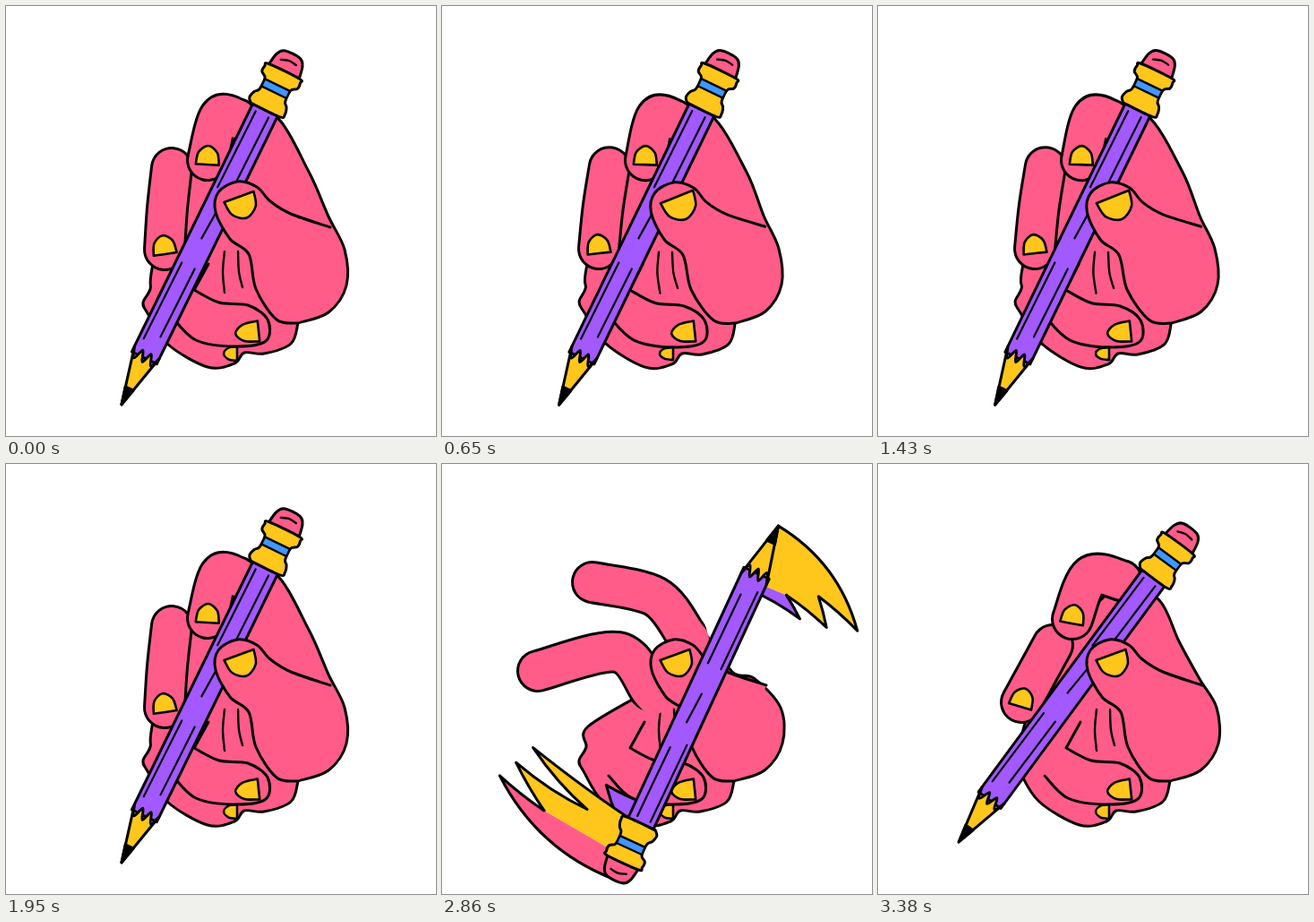
An HTML page with a canvas that plays this animation: 480 px wide and 480 px high, repeating every 3.51 s.

```html
<!DOCTYPE html>
<html lang="en">
<head>
<meta charset="utf-8">
<title>Pencil spin</title>
<style>
html, body { margin: 0; width: 100%; height: 100%; overflow: hidden; background: #fff; }
canvas { display: block; width: 100vw; height: 100vh; }
</style>
</head>
<body>
<canvas id="stage" width="480" height="480"></canvas>
<script>
const ctx = document.getElementById('stage').getContext('2d');
const PINK = '#ff5c8a', PURPLE = '#a259ff', YELLOW = '#ffc61c', BLUE = '#3f97ff', INK = '#000';
const STEP = 130, IDLE_STEPS = 18, SPIN_STEPS = 9;
const FINGER = 45, HALF = 218;

// "x y, x y": a repeated point makes a corner, all others are smooth.
const points = text => text.split(',').map(pair => pair.trim().split(' ').map(Number));
const mirrored = text => {
  const half = points(text);
  return half.concat(half.map(([x, y]) => [-x, y]).reverse());
};
const lerp = (a, b, t) => a + (b - a) * t;
const radians = deg => deg * Math.PI / 180;

// Fixed parts of the hand.
const palm = points('378 272, 380 312, 360 342, 326 354, 326 354, 318 377, 288 388, 266 387, 255 399, 225 403, 180 377, 158 343, 153 331, 161 316, 163 293');
const thumb = points('362 247, 318 232, 295 218, 280 202, 258 196, 237 208, 234 230, 250 260, 271 277, 279 316, 302 350, 326 354');
const ring = points('226 288, 210 317, 210 317, 238 331, 270 334, 292 350, 290 374, 255 380, 212 373, 186 348');

// Moving parts: edge of the back, then finger bones from knuckle to tip.
const pose = (back, index, middle) =>
  ({ back: points(back), index: points(index), middle: points(middle) });
const grip = pose('300 122, 338 185, 360 235', '258 126, 238 124, 225 172', '185 181, 180 226, 177 272');
const upright = pose('275 124, 308 166, 350 238', '262 150, 222 132, 191 124', '188 188, 192 235, 204 279');
const open = pose('292 188, 324 232, 348 239', '272 190, 238 148, 168 132', '232 252, 196 210, 107 231');
const caught = pose('314 152, 336 198, 359 240', '272 130, 237 125, 217 173', '195 202, 177 235, 160 266');

// Shape of the pencil, tip at the origin, eraser upwards.
const shaft = points('-15.5 -58, -15.5 -366, 15.5 -366, 15.5 -58');
const ferrule = mirrored('-18 -366, -22 -371, -20 -379, -16 -384, -16 -398, -22 -403, -22 -410, -19 -414');
const eraser = mirrored('-19 -412, -19 -412, -16 -428, -9 -435');
const shine = points('-9 -424, 0 -427, 9 -426');
const wave = Array.from({ length: 7 }, (_, i) => [-15.5 + i * 31 / 6, i % 2 ? -53 : -65]);

// Trails in polar form around the pencil's middle: radius, lag in degrees, bend.
const tipTrails = [
  [YELLOW, [[150, 0], [218, 0], [197, 41, 16], [181, 24], [168, 35], [157, 15]]],
  [PURPLE, [[157, 15], [149, 26], [140, 0], [150, 0]]]
];
const eraserTrails = [
  [PURPLE, [[150, 0], [155, 10], [136, 23], [125, 0]]],
  [YELLOW, [[190, 0], [150, 0], [189, 50, -14], [170, 21], [212, 47], [208, 30]]],
  [PINK, [[190, 0], [217, 0], [234, 45, 16], [208, 30]]]
];

function trace(p) {
  ctx.beginPath();
  ctx.moveTo(...p[0]);
  for (let i = 0; i < p.length - 1; i++) {
    const a = p[i - 1] || p[i], b = p[i], c = p[i + 1], d = p[i + 2] || c;
    if (b[0] === c[0] && b[1] === c[1]) continue;
    ctx.bezierCurveTo(b[0] + (c[0] - a[0]) / 6, b[1] + (c[1] - a[1]) / 6,
      c[0] - (d[0] - b[0]) / 6, c[1] - (d[1] - b[1]) / 6, c[0], c[1]);
  }
}

function paint(fill, width = 3) {
  if (fill) {
    ctx.fillStyle = fill;
    ctx.fill();
  }
  ctx.lineWidth = width;
  ctx.stroke();
}

function draw(p, fill, width) {
  trace(p);
  paint(fill, width);
}

function polygon(p, fill) {
  ctx.beginPath();
  p.forEach(q => ctx.lineTo(...q));
  ctx.closePath();
  paint(fill);
}

function at(x, y, turn, paintParts) {
  ctx.save();
  ctx.translate(x, y);
  ctx.rotate(radians(turn));
  paintParts();
  ctx.restore();
}

// Straight edge centred on (0, base), round end above it.
function nail(x, y, turn, w, h, base = 0) {
  at(x, y, turn, () => {
    const left = [-w / 2, base], right = [w / 2, base];
    draw([left, left, right, right, [w * 0.4, base - h * 0.65], [0, base - h],
      [-w * 0.4, base - h * 0.65], left, left], YELLOW, 2.6);
  });
}

function finger(bones) {
  const [knuckle, joint, tip] = bones;
  const hangs = tip[1] > knuckle[1] + 15;
  trace(bones);
  ctx.lineWidth = FINGER + 3;
  ctx.stroke();
  // A lifted finger runs into the hand without an edge.
  const gap = Math.hypot(knuckle[0] - joint[0], knuckle[1] - joint[1]);
  const inner = knuckle.map((v, i) => v + (v - joint[i]) * 8 / gap);
  trace(hangs ? bones : [inner, ...bones]);
  ctx.strokeStyle = PINK;
  ctx.lineWidth = FINGER - 3;
  ctx.stroke();
  ctx.strokeStyle = INK;
  if (hangs) {
    const lean = Math.atan2(joint[0] - tip[0], tip[1] - joint[1]) * 180 / Math.PI;
    nail(...tip, lean - 12, 26, 21, 5);
  }
}

function trail(color, p, heading) {
  const place = (r, lag) => {
    const a = radians(heading + lag);
    return [r * Math.cos(a), r * Math.sin(a)];
  };
  ctx.beginPath();
  p.forEach(([r, lag, bend = 0], i) => {
    const [r0, lag0] = p[i - 1] || p[i];
    if (!i) ctx.moveTo(...place(r, lag));
    else ctx.quadraticCurveTo(...place((r0 + r) / 2 + bend, (lag0 + lag) / 2), ...place(r, lag));
  });
  paint(color);
}

function drawPencil({ x, y, turn, loose }) {
  at(x, y, turn, () => {
    if (loose) {
      for (const [color, p] of tipTrails) trail(color, p, 90);
      for (const [color, p] of eraserTrails) trail(color, p, -90);
    }
    ctx.translate(0, HALF);
    polygon(shaft, PURPLE);
    for (const top of [-360, -172]) {
      draw([[-9, top], [-10, top + 95]], null, 2.2);
      draw([[7, top], [6, top + 85]], null, 2.2);
      draw([[1, top + 118], [-1, top + 154]], null, 2.2);
    }
    trace(wave);
    ctx.lineTo(0, 0);
    ctx.closePath();
    paint(YELLOW);
    polygon([[0, 0], [-5, -20], [5, -20]], INK);
    draw(eraser, PINK);
    draw(shine, null, 2.4);
    draw([...ferrule, ferrule[0]], YELLOW);
    ctx.fillStyle = BLUE;
    ctx.fillRect(-15, -397, 30, 9);
    ctx.lineWidth = 2.4;
    ctx.strokeRect(-15.5, -397, 31, 9);
  });
}

function drawScene({ hand, pencil, sway }) {
  const warp = p => p.map(([x, y]) => [x - sway * Math.sin(y / 35), y + sway * Math.sin(x / 35) / 2]);
  const index = warp(hand.index), middle = warp(hand.middle);
  const drawThumb = () => {
    draw(warp(thumb), PINK);
    nail(260 + sway, 213, 160 - sway, 35 + 2 * sway, 25 + sway);
  };

  draw([index[0], index[0], ...warp([...hand.back, ...palm]),
    middle[0], middle[0], index[0], index[0]], PINK);
  nail(258, 388, -90, 16 - sway, 15);
  draw(warp(ring), PINK);
  nail(282, 363, -96, 23, 26);
  for (let i = 0; i < 2; i++) {
    draw(warp([[244 + 15 * i, 274], [242 + 18 * i, 297], [244 + 20 * i, 320 - 6 * i]]), null, 2.4);
  }
  finger(middle);
  finger(index);
  if (pencil.loose) drawThumb();
  drawPencil(pencil);
  if (!pencil.loose) drawThumb();
}

// Key moments of the spin; lift tosses the pencil on the way to a key.
const keys = [
  { step: -1, hand: grip, x: 224.5, y: 249, turn: 26 },
  { step: 1, hand: upright, x: 236, y: 250, turn: 1.5, power: 1, lift: 0 },
  { step: 4, hand: open, x: 284, y: 267, turn: -155.2, power: 2, lift: 0 },
  { step: 8, hand: caught, x: 219.5, y: 246.5, turn: -323.6, power: 1, lift: 50 }
];

function mixHands(a, b, t) {
  const out = {};
  for (const part in a) {
    out[part] = a[part].map((p, i) => p.map((v, j) => lerp(v, b[part][i][j], t)));
  }
  return out;
}

function idleScene(step) {
  const sway = step % 3, { hand, x, y, turn } = keys[0];
  return { hand, sway, pencil: { x: x + sway / 2, y, turn: turn - sway / 10 } };
}

function spinScene(step) {
  const n = keys.findIndex(key => key.step >= step);
  const a = keys[n - 1], b = keys[n];
  const u = (step - a.step) / (b.step - a.step), t = u ** b.power;
  const pencil = {
    x: lerp(a.x, b.x, t),
    y: lerp(a.y, b.y, t) - b.lift * Math.sin(Math.PI * u),
    turn: lerp(a.turn, b.turn, t)
  };
  pencil.loose = pencil.turn < -60 && pencil.turn > -200;
  return { hand: mixHands(a.hand, b.hand, t), sway: 0, pencil };
}

const start = performance.now();

function render() {
  const step = Math.floor((performance.now() - start) / STEP) % (IDLE_STEPS + SPIN_STEPS);
  ctx.fillStyle = '#fff';
  ctx.fillRect(0, 0, 480, 480);
  ctx.strokeStyle = INK;
  ctx.lineCap = ctx.lineJoin = 'round';
  drawScene(step < IDLE_STEPS ? idleScene(step) : spinScene(step - IDLE_STEPS));
  requestAnimationFrame(render);
}
render();
</script>
</body>
</html>
```
